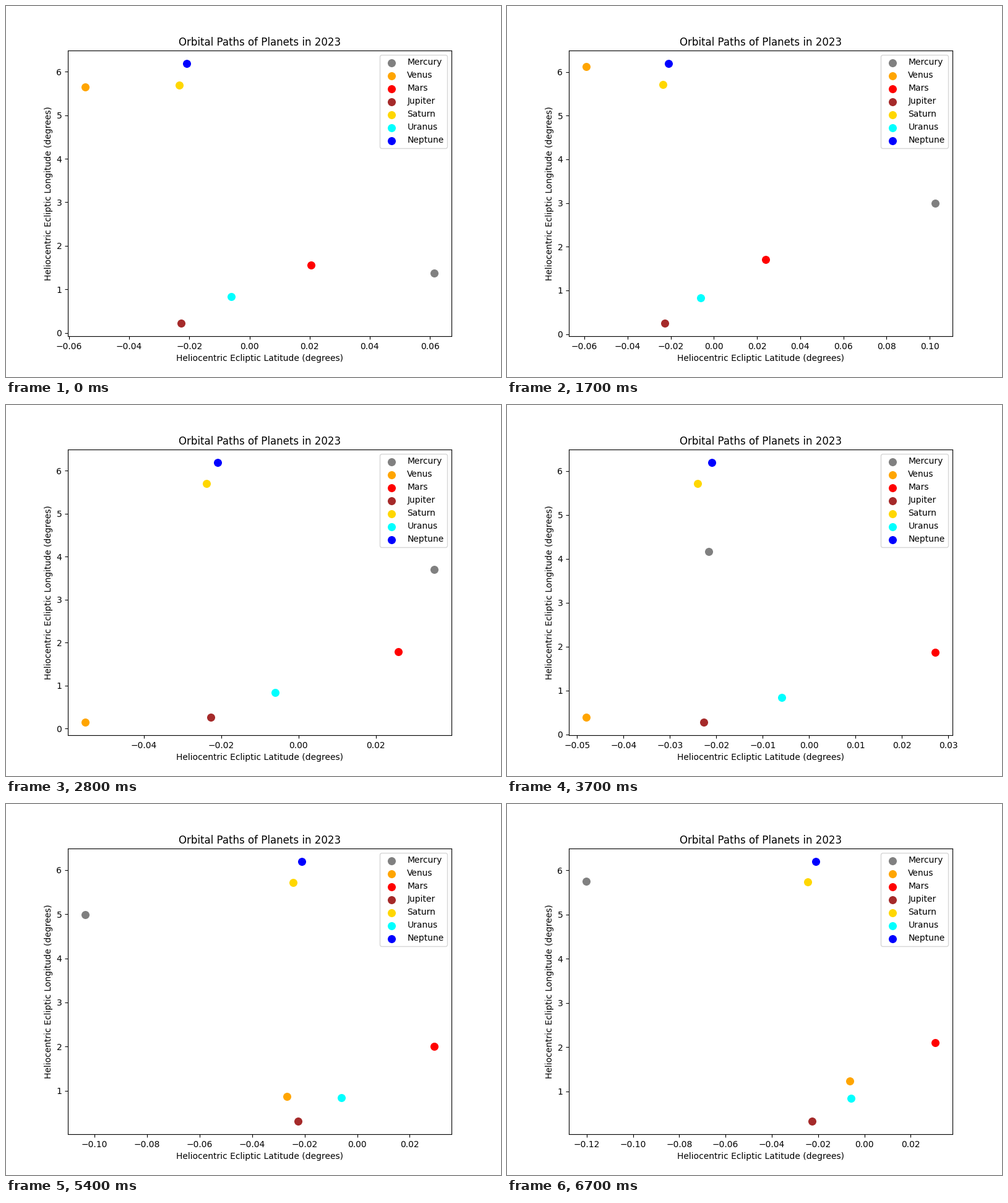
Write a matplotlib script that moves like this. It is 800 by 600 pixels and loops after 6.8 s.

```python
import numpy as np
import matplotlib.pyplot as plt
from matplotlib.animation import FuncAnimation

FRAMES, INTERVAL = 68, 100
START = 8402.5  # days since J2000 on 2023-01-03, 0h

# colour, eccentricity, inclination, mean longitude at J2000,
# degrees per century, perihelion longitude, ascending node
PLANETS = {
    "Mercury": ("gray", 0.205636, 7.0036, 252.25032, 149472.67411, 77.4947, 48.3019),
    "Venus": ("orange", 0.006767, 3.3945, 181.97910, 58517.81539, 131.6031, 76.6160),
    "Mars": ("red", 0.093410, 1.8478, -4.55343, 19140.30268, -23.8414, 49.4922),
    "Jupiter": ("brown", 0.048356, 1.3040, 34.45644, 3034.74613, 14.7774, 100.5210),
    "Saturn": ("gold", 0.053745, 2.4864, 49.83424, 1222.49362, 92.5025, 113.5960),
    "Uranus": ("cyan", 0.047247, 0.7721, 313.23810, 428.48203, 171.0480, 74.0270),
    "Neptune": ("blue", 0.008602, 1.7700, -55.12003, 218.45945, 44.8906, 131.7830),
}


def kepler(mean, ecc):
    """Solve Kepler's equation and return the true anomaly."""
    E = mean
    for _ in range(12):
        E -= (E - ecc * np.sin(E) - mean) / (1 - ecc * np.cos(E))
    return 2 * np.arctan2(np.sqrt(1 + ecc) * np.sin(E / 2),
                          np.sqrt(1 - ecc) * np.cos(E / 2))


def position(day, ecc, incl, mean_lon, rate, peri, node):
    """Heliocentric longitude and latitude (radians), equinox of date."""
    T = day / 36525
    incl, peri, node = np.radians([incl, peri, node])
    mean = np.radians(mean_lon + rate * T) - peri
    mean = (mean + np.pi) % (2 * np.pi) - np.pi
    u = kepler(mean, ecc) + peri - node
    lon = node + np.arctan2(np.cos(incl) * np.sin(u), np.cos(u))
    lat = np.arcsin(np.sin(incl) * np.sin(u))
    # precession of the equinox and of the ecliptic plane
    lat -= np.radians(0.013056 * T) * np.sin(lon - np.radians(174.87))
    lon += np.radians(1.39697 * T)
    return lon % (2 * np.pi), lat


fig, ax = plt.subplots(figsize=(8, 6), dpi=100)


def update(frame):
    ax.clear()
    for name, (color, *orbit) in PLANETS.items():
        lon, lat = position(START + frame, *orbit)
        ax.scatter(lat, lon, s=70, color=color, label=name)
    ax.set_xlabel("Heliocentric Ecliptic Latitude (degrees)")
    ax.set_ylabel("Heliocentric Ecliptic Longitude (degrees)")
    ax.set_title("Orbital Paths of Planets in 2023")
    ax.legend(loc="upper right")


anim = FuncAnimation(fig, update, frames=FRAMES, interval=INTERVAL,
                     init_func=lambda: None, repeat=True, repeat_delay=0)
plt.show()
```
